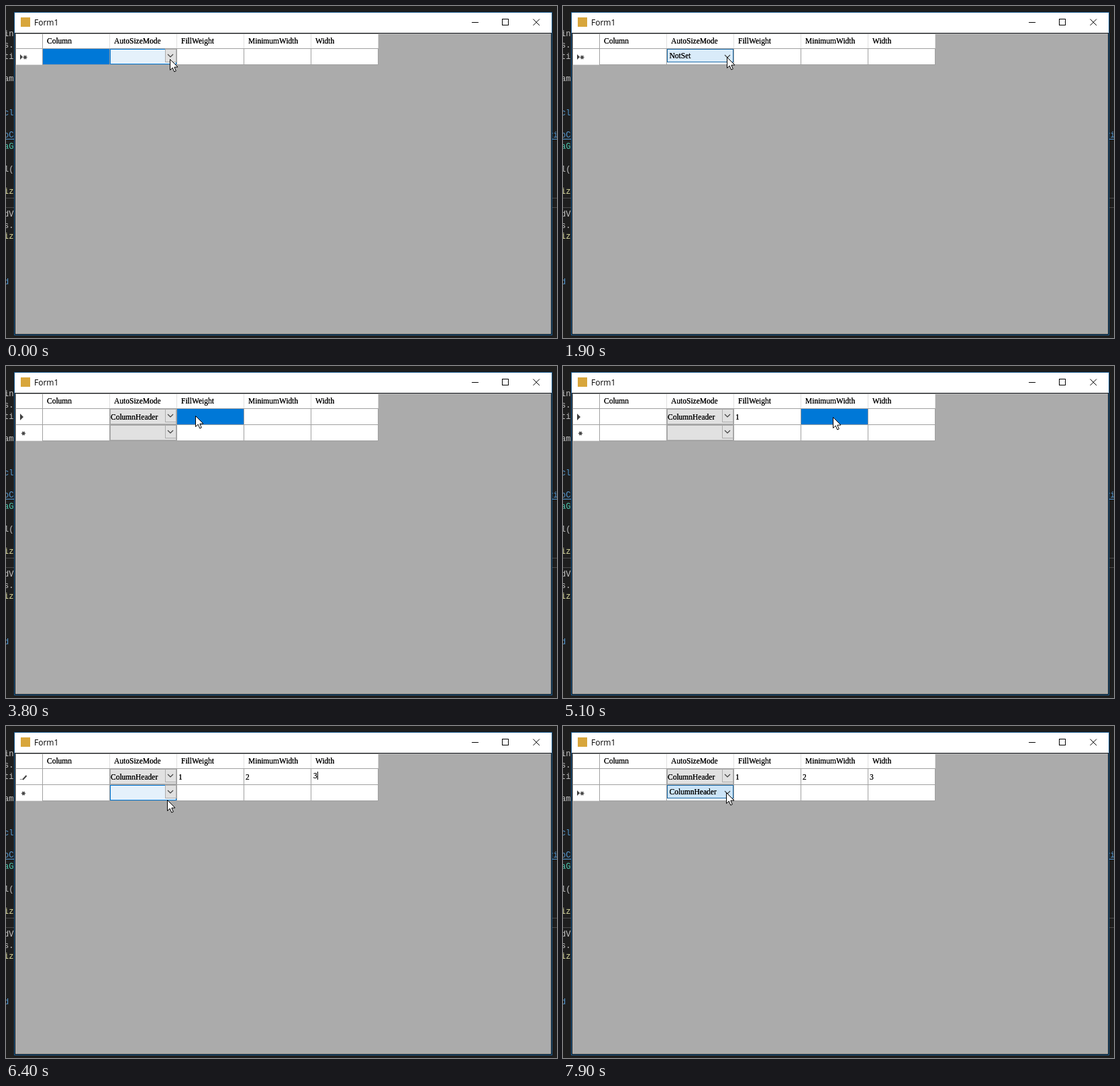
An HTML page with a canvas that plays this animation: 821 px wide and 495 px high, repeating every 8 s.

```html
<!DOCTYPE html>
<html lang="en">
<head>
<meta charset="utf-8">
<title>Form1</title>
<style>
html, body { margin: 0; height: 100%; overflow: hidden; background: #1e1e1e; }
canvas { display: block; }
</style>
</head>
<body>
<canvas id="stage" width="821" height="495"></canvas>
<script>
const ctx = document.getElementById('stage').getContext('2d');
const LOOP = 8000, TICK = 100;
const GRID_FONT = '11.5px "Liberation Serif", serif';
const CODE_FONT = '12px "Liberation Mono", monospace';
const HEADERS = ['Column', 'AutoSizeMode', 'FillWeight', 'MinimumWidth', 'Width'];
const MODES = ['NotSet', 'None', 'ColumnHeader', 'AllCellsExceptHeader', 'AllCells',
  'DisplayedCellsExceptHeader', 'DisplayedCells', 'Fill'];
const CODE = 'ing|s.D|tin||amp|||cla||oCo|aGr||l(||ize||dVi|s..|ize||||d D'.split('|');
const CODE_COLORS = { cla: '#569cd6', oCo: '#569cd6', 'd D': '#569cd6', aGr: '#4ec9b0', ize: '#dcdca0' };
const BLUE = '#0078d7', LINE = '#a0a0a0', PALE = '#e0e0e0', DARK = '#404040';

// The story: when things happen, in ms
const CLICKS = [600, 3800, 5100, 5700, 6700]; // each click selects the next cell
const TYPED = [4600, 5200, 6100];             // digits 1, 2, 3 in the last three columns
const DROPS = [[1600, 1900], [2100, 3300], [7700, 7800]];
const PICK = 3300, FIRST_EDIT = 1600, SECOND_EDIT = 7700;
// Pointer moves: leave, arrive, x, y
const START = { x: 244, y: 79 };
const MOVES = [
  [900, 1300, 244, 76], [2300, 3000, 226, 115], [3300, 3700, 282, 74], [4600, 4800, 402, 76],
  [5100, 5400, 498, 90], [5500, 5700, 490, 78], [6100, 6400, 240, 110], [6600, 7000, 240, 102],
  [7100, 7400, 243, 99]
];

const colX = col => 55 + col * 100;
const rowY = row => 64 + row * 24;
const clamp = v => Math.max(0, Math.min(1, v));
const ease = v => v * v * (3 - 2 * v);

function pointerAt(t) {
  let { x, y } = START;
  for (const [leave, arrive, toX, toY] of MOVES) {
    const k = ease(clamp((t - leave) / (arrive - leave)));
    x += (toX - x) * k;
    y += (toY - y) * k;
  }
  return { x: Math.round(x), y: Math.round(y) };
}

function fill(color, x, y, w, h) {
  ctx.fillStyle = color;
  ctx.fillRect(x, y, w, h);
}

function frame(color, x, y, w, h) {
  ctx.strokeStyle = color;
  ctx.lineWidth = 1;
  ctx.strokeRect(x + .5, y + .5, w - 1, h - 1);
}

function box(back, border, x, y, w, h) {
  fill(back, x, y, w, h);
  frame(border, x, y, w, h);
}

function text(str, x, y, color = '#000', font = GRID_FONT) {
  ctx.font = font;
  ctx.fillStyle = color;
  ctx.fillText(str, x, y);
}

// Painted twice to get the dense strokes of screen type
function gridText(str, x, y, color) {
  text(str, x, y, color);
  text(str, x, y, color);
}

function path(points, stroke, back, width = 1) {
  ctx.beginPath();
  points.forEach(([x, y]) => ctx.lineTo(x, y));
  if (back) {
    ctx.closePath();
    ctx.fillStyle = back;
    ctx.fill();
  }
  if (stroke) {
    ctx.strokeStyle = stroke;
    ctx.lineWidth = width;
    ctx.stroke();
  }
}

function clipped(x, y, w, h, draw) {
  ctx.save();
  ctx.beginPath();
  ctx.rect(x, y, w, h);
  ctx.clip();
  draw();
  ctx.restore();
}

function drawEditor() {
  fill('#1e1e1e', 0, 0, 821, 495);
  CODE.forEach((str, i) =>
    text(str, -3, 45 + Math.round(i * 16.8), CODE_COLORS[str] || '#c8c8c8', CODE_FONT));
  text('vi', 808, 196, CODE_COLORS.oCo, CODE_FONT);
  fill(CODE_COLORS.oCo, 0, 198, 821, 1);
  fill('#4a4a4a', 0, 286, 821, 1);
  fill('#4a4a4a', 0, 300, 821, 1);
}

function drawWindow() {
  box('#fff', '#1d5f94', 12, 9, 802, 482);
  box('#ababab', '#101418', 13, 40, 800, 450);
  fill('#d8a63c', 22, 17, 14, 14);
  text('Form1', 42, 29, '#000', '12px "Open Sans", sans-serif');
  fill('#000', 694, 24, 10, 1);
  frame('#000', 739, 19, 10, 10);
  path([[785.5, 19.5], [795, 29]], '#000');
  path([[795, 19.5], [785.5, 29]], '#000');
}

function drawGrid(rows) {
  const height = 23 + rows * 24;
  fill('#fff', 14, 41, 541, height);
  fill(LINE, 14, 41, 541, 1);
  fill(LINE, 14, 41, 1, height);
  for (let row = 0; row <= rows; row++) fill(LINE, 14, rowY(row) - 1, 541, 1);
  fill(PALE, 15, rowY(rows) - 1, 39, 1);
  for (let col = 0; col <= HEADERS.length; col++) {
    const x = colX(col) - 1;
    fill(col ? PALE : LINE, x, 42, 1, 21);
    fill(LINE, x, 64, 1, rows * 24);
  }
  HEADERS.forEach((name, col) => gridText(name, colX(col) + 6, 56));
}

function drawTriangle(row, size) {
  const y = rowY(row) + 12;
  path([[21, y - size], [21 + size, y], [21, y + size]], null, DARK);
}

function drawStar(row, x) {
  const y = rowY(row) + 12.5;
  for (let angle = 0; angle < 3; angle += Math.PI / 3) {
    const dx = 3 * Math.cos(angle), dy = 3 * Math.sin(angle);
    path([[x - dx, y - dy], [x + dx, y + dy]], DARK, null, 1.5);
  }
}

function drawPencil(row) {
  const y = rowY(row) + 12;
  fill(DARK, 21, y + 3, 1, 1);
  fill(DARK, 23, y + 3, 1, 1);
  path([[25, y + 4], [30.5, y - 2]], DARK, null, 2);
}

function drawNewCurrent(row) {
  drawTriangle(row, 4);
  drawStar(row, 28.5);
}

function drawChevron(y) {
  path([[241, y - 2], [245, y + 2], [249, y - 2]], DARK, null, 1.2);
}

function drawCombo(row, value, hot, focused) {
  const y = rowY(row);
  box(hot ? '#e5f1fb' : '#e1e1e1', hot ? BLUE : '#adadad', 155, y, 99, 23);
  box('#e1e1e1', '#adadad', 237, y, 17, 20);
  drawChevron(y + 10);
  gridText(value, 156, y + 16);
  if (focused) {
    ctx.setLineDash([1, 1]);
    frame(DARK, 157, y + 2, 79, 19);
    ctx.setLineDash([]);
  }
}

function drawComboEditor(row, value, back) {
  const y = rowY(row);
  fill('#fff', 155, y, 99, 23);
  box(back, '#1a6aa8', 155, y, 99, 20);
  drawChevron(y + 11);
  gridText(value, 158.5, y + 14);
}

function drawList(row, amount, pointer, value) {
  const top = rowY(row) + 19, height = 98, shown = Math.round(height * amount);
  const hovered = Math.floor((pointer.y - top - 1) / 12);
  const active = hovered < 0 ? value : hovered;
  fill('rgba(0,0,0,.22)', 158, top + 3, 99, shown);
  fill('rgba(0,0,0,.28)', 157, top + 2, 99, shown);
  clipped(155, top, 99, shown, () => {
    const y = top + shown - height;
    box('#fff', '#1a6aa8', 155, y, 99, height);
    clipped(156, y + 1, 97, 96, () => MODES.forEach((mode, i) => {
      const on = i === active, itemY = y + 1 + i * 12;
      if (on) fill(BLUE, 156, itemY, 97, 12);
      gridText(mode, 157.5, itemY + 10, on ? '#fff' : '#000');
    }));
  });
}

function drawPointer({ x, y }) {
  path([[0, 0], [0, 16], [3.7, 12.6], [6.3, 18.5], [8.8, 17.4], [6.3, 11.7], [11.5, 11.5]]
    .map(([dx, dy]) => [x + .5 + dx, y + .5 + dy]), '#000', '#fff');
}

function draw(t) {
  const pointer = pointerAt(t);
  const selected = CLICKS.filter(click => click <= t).length;
  const onNewRow = selected === CLICKS.length;
  const picked = t >= PICK ? 2 : 0;
  const rows = picked ? 2 : 1;
  const editRow = t >= SECOND_EDIT ? 1 : t >= FIRST_EDIT && t < CLICKS[1] ? 0 : -1;
  const typing = TYPED.findIndex((time, i) => t >= time && t < CLICKS[i + 2]);

  drawEditor();
  drawWindow();
  drawGrid(rows);

  if (rows === 1) drawNewCurrent(0);
  else if (onNewRow) drawNewCurrent(1);
  else {
    if (typing >= 0 || editRow === 0) drawPencil(0);
    else drawTriangle(0, 5);
    drawStar(1, 26);
  }

  if (selected !== 1 && !onNewRow && typing < 0) fill(BLUE, colX(selected), 64, 99, 23);

  for (let row = 0; row < rows; row++) {
    if (row === editRow) {
      drawComboEditor(row, MODES[picked], t >= 1900 && t < 2000 ? '#d9ebf9' : '#cce4f7');
    } else {
      const dy = pointer.y - rowY(row);
      const hot = pointer.x >= 155 && pointer.x < 254 && dy >= 0 && dy < 24;
      const focused = row ? onNewRow : selected === 1;
      drawCombo(row, picked && !row ? MODES[picked] : '', hot, focused);
    }
  }

  TYPED.forEach((time, i) => {
    if (t < time) return;
    const editing = i === typing, x = colX(i + 2);
    gridText(String(i + 1), x + (editing ? 3 : 2), editing ? 78 : 80);
    if (editing) fill('#000', x + 9, 68, 1, 12);
  });

  const drop = DROPS.find(([start, end]) => t >= start && t < end);
  if (drop) drawList(editRow, clamp((t - drop[0] + TICK) / 200), pointer, picked);
  drawPointer(pointer);
}

function tick() {
  draw(Math.floor(performance.now() % LOOP / TICK) * TICK);
  requestAnimationFrame(tick);
}
tick();
</script>
</body>
</html>
```
